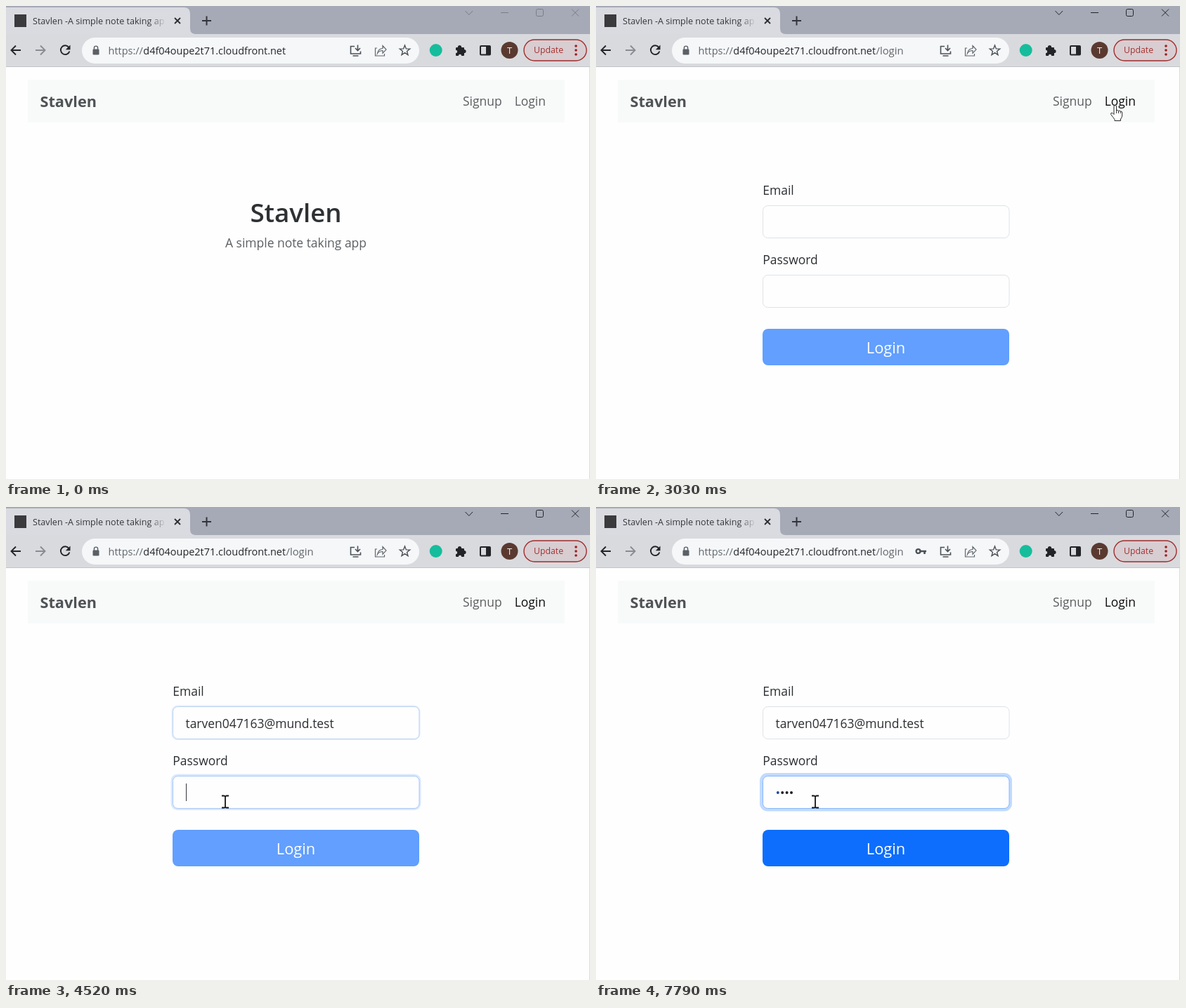
These frames come from a looping animation (831 px wide and 674 px high, 8000 ms). An HTML page with a canvas:

```html
<!DOCTYPE html>
<html lang="en">
<head>
<meta charset="utf-8">
<title>Note taking app login</title>
<style>
html, body { margin: 0; width: 100%; height: 100%; overflow: hidden; background: #fefefe; }
canvas { display: block; }
</style>
</head>
<body>
<canvas id="stage" width="831" height="674"></canvas>
<script>
const g = document.getElementById('stage').getContext('2d');
const LOOP = 8000;
const BRAND = 'Stavlen';
const EMAIL = 'tarven047163@mund.test';
const SUGGESTIONS = [EMAIL, 'Tarven.BommenaDrosuvek@mund.test', 'mo@mund.test',
  'owner@sample.test', 'zzzzz', 'benomrudavek1@mund.test'];
const BODY = 17.45;

const LOGIN_PAGE = 3030, EMAIL_FOCUS = 3370, POPUP_OPEN = 3510, ROW_HOVER = 3650,
  POPUP_CLOSE = 3980, PASS_FOCUS = 4450, KEY_ICON = 6090;
const KEYS = [6000, 6330, 7060, 7260];
const CARET_ON = [[4450, 4990], [5540, 6860], [7060, 7790]];
const CLICKS = [[2890, 3030], [3370, 3440], [3710, 3840], [4390, 4520]];

const linear = p => p;
const smooth = p => p * p * (3 - 2 * p);
const easeOut = p => 1 - (1 - p) ** 1.4;
// start, end, steps, easing, then a quadratic curve
const MOVES = [
  [260, 1000, 12, easeOut, 628, 690, 830, 330, 702, 177],
  [1070, 1350, 5, smooth, 702, 177, 420, 270, 104, 158],
  [1680, 2160, 8, smooth, 104, 158, 420, 104, 728, 150],
  [2620, 2620, 1, linear, 728, 150, 734, 145, 739, 140],
  [3100, 3370, 5, smooth, 739, 140, 620, 260, 435, 317],
  [3510, 3650, 3, linear, 435, 317, 406.5, 342.5, 378, 368],
  [3980, 4320, 6, smooth, 378, 368, 335, 390, 312, 420]
];

const ARROW = 'M.5 .5V17L4.3 13.3 6.9 19.5Q8.5 20 9.5 18.4L6.9 12.5H12.3Z';
const HAND = 'M-2 14V2.5Q-.2 .5 1.5 2.5V9Q3 7.5 4.5 9.5 6 8.3 7.3 10.2 9.5 9.5 9.7 12V16' +
  'Q9.5 19 7.5 21V23.5H-1V21.5Q-3 19 -6.3 14.5 -7 12 -4.2 12.3L-2 14.5Z';
const FINGERS = 'M1.5 9V13M4.5 9.5V13M7.3 10.2V13';
const IBEAM = 'M-5 -8.5H-1.5L0 -7.5 1.5 -8.5H5M0 -8V8M-5 8.5H-1.5L0 7.5 1.5 8.5H5';

const during = (t, spans) => spans.some(([a, b]) => t >= a && t < b);
const inside = (p, x0, y0, x1, y1) => p.x >= x0 && p.x < x1 && p.y >= y0 && p.y < y1;

function text(s, x, y, size, color, weight = 400, align = 'left') {
  g.font = `${weight} ${size}px "Open Sans", "Noto Sans", sans-serif`;
  g.textAlign = align;
  g.fillStyle = color;
  g.fillText(s, x, y);
}
function rect(x, y, w, h, color) {
  g.fillStyle = color;
  g.fillRect(x, y, w, h);
}
function box(x, y, w, h, r, fill, line, width = 1) {
  g.beginPath();
  g.roundRect(x, y, w, h, r);
  if (fill) { g.fillStyle = fill; g.fill(); }
  if (line) { g.strokeStyle = line; g.lineWidth = width; g.stroke(); }
}
function disc(x, y, r, color) {
  g.beginPath();
  g.arc(x, y, r, 0, 7);
  g.fillStyle = color;
  g.fill();
}
function stroke(d, color, width = 1.5) {
  g.strokeStyle = color;
  g.lineWidth = width;
  g.stroke(new Path2D(d));
}
function fill(d, color) {
  g.fillStyle = color;
  g.fill(new Path2D(d));
}

function drawTabs(t) {
  rect(0, 0, 831, 41, '#a6aab6');
  fill('M0 2H253Q262 2 262 11V32Q262 40 270 40V41H0Z', '#dadbe0');
  rect(12, 12, 17, 18, '#3b3b3d');
  const fade = g.createLinearGradient(204, 0, 228, 0);
  fade.addColorStop(0, '#33353a');
  fade.addColorStop(1, 'rgba(51,53,58,0)');
  text(BRAND + ' -A simple note taking ap', 38, 25.5, 12.6, fade);
  stroke('M240 17l8 8M248 17l-8 8', '#2b2c30', 1.8);
  stroke('M279 21h13M285.5 14.5v13', '#33343a', 2);

  const c = t < 2890 ? '#7a7d88' : '#222328';
  stroke('M653.5 7l5.3 5.5 5.3-5.5M704 9.5h11M805 4.5l10 10M815 4.5l-10 10', c, 1);
  box(754.5, 4.5, 10, 10, 2, null, c);
}

function star(x, y, color) {
  g.beginPath();
  for (let i = 0; i < 10; i++) {
    const r = i % 2 ? 3.2 : 7.6, a = i * Math.PI / 5 - Math.PI / 2;
    g.lineTo(x + r * Math.cos(a), y + r * Math.sin(a));
  }
  g.closePath();
  g.strokeStyle = color;
  g.lineWidth = 1.4;
  g.stroke();
}

function drawToolbar(t) {
  const black = '#232428', dark = '#4c5056', soft = '#62666c', bar = '#d9dade';
  rect(0, 40, 831, 46, bar);
  rect(0, 86, 831, 1, '#c3c4c8');
  box(108, 45, 480, 37, 18.5, '#f5f7f9');
  stroke('M21 63H8M14 56.5L7.5 63l6.5 6.5', black, 1.9);
  stroke('M42 63H55M49 56.5l6.5 6.5-6.5 6.5', '#8a8c92', 1.9);
  stroke('M89.5 59A6.4 6.4 0 1 0 90.4 64.5', black, 1.9);
  fill('M91.5 55.5v6.7h-6.7z', black);

  box(123.5, 61.5, 9, 8, 1.3, '#5b5f66');
  stroke('M125.4 62v-2.3a2.6 2.6 0 0 1 5.2 0V62', '#5b5f66', 1.4);
  text('https://', 145.5, 68.5, 14.5, soft);
  text('d4f04oupe2t71.cloudfront.net', 195.3, 68.5, 14.45, '#222428');
  if (t >= LOGIN_PAGE) text('/login', 398.5, 68.5, 14.8, soft);

  if (t >= KEY_ICON) {
    stroke('M455.6 63a2.9 2.9 0 1 0 5.8 0a2.9 2.9 0 1 0-5.8 0', dark, 2.4);
    stroke('M461.5 63H470M467.5 63v4', dark, 2.6);
  }
  stroke('M496 57.5H490.5V68H504.5V64.5M493.5 71H501.5', dark, 1.6);
  stroke('M500.5 55.5v7M497 60l3.5 3.5 3.5-3.5', dark, 1.6);
  stroke('M528 60H525.5V71H538.5V68M528.5 67.5Q530 60.5 536 60.5V56.5L541 62 536 67.3V63.5Q531 63.5 528.5 67.5Z', soft, 1.2);
  star(567.5, 63.5, dark);

  disc(611.7, 63, 9, '#15bd9c');
  box(640, 59, 12, 12, 1, black);
  disc(645.5, 58.5, 2.6, black);
  disc(652, 64.5, 2.6, black);
  disc(640, 65, 2.2, bar);
  disc(646, 71, 2.2, bar);
  box(675, 57, 14, 12.5, 1, null, black, 2);
  rect(683, 57, 6, 12.5, black);
  disc(716.5, 63, 12, '#5a3a30');
  text('T', 716.5, 68, 13, '#f4efed', 400, 'center');

  box(737, 48, 89, 30, 15, '#d8cdd1', '#a12d2c', 1.4);
  text('Update', 751, 67, 12.3, '#a6302f');
  for (const y of [57, 63, 69]) disc(811, y, 1.8, '#9c1c1c');
}

function drawNav(t, hover) {
  const plain = '#5b5d5e', hot = '#333';
  rect(31, 105, 764, 61, '#f8fafa');
  text(BRAND, 48.5, 144, 21.7, '#505355', 700);
  text('Signup', 650, 142, BODY, hover === 'signup' ? hot : plain);
  text('Login', 723.7, 142, BODY, t >= LOGIN_PAGE ? '#0b0b0b' : hover === 'login' ? hot : plain);
}

function drawHome() {
  text(BRAND, 412.5, 308, 36.7, '#2e3134', 600, 'center');
  text('A simple note taking app', 412.5, 344, BODY, '#5c6064', 400, 'center');
}

const ringAt = (t, start) => t < start ? 0 : [0, 0.6, 1][Math.min(2, Math.floor((t - start) / 70))];

function field(y, ring) {
  if (ring > 0) {
    const s = 4 * ring;
    box(237 - s, y - s, 351 + 2 * s, 46.5 + 2 * s, 7 + s, `rgba(13,110,253,${0.25 * ring})`);
  }
  const mix = (a, b) => Math.round(a + (b - a) * ring);
  box(237.5, y + 0.5, 350.5, 46, 7, '#fefefe', `rgb(${mix(222, 134)},${mix(226, 183)},${mix(230, 254)})`);
}

function drawLogin(t) {
  const ink = '#2b2e32';
  const passRing = ringAt(t, PASS_FOCUS);
  const emailRing = t < PASS_FOCUS ? ringAt(t, EMAIL_FOCUS) : 1 - passRing;
  text('Email', 237.3, 269, BODY, ink);
  field(284, emailRing);
  if (t >= ROW_HOVER) text(EMAIL, 255.5, 315, BODY, ink);
  text('Password', 237.3, 368, BODY, ink);
  field(383, passRing);

  const typed = KEYS.filter(k => t >= k).length;
  for (let i = 0; i < typed; i++) disc(258.8 + 6.4 * i, 407, 2, i ? '#1e2126' : '#234d9b');
  if (during(t, CARET_ON)) rect(Math.round(255.6 + 6.4 * typed), 394, 1, 25, typed === 1 ? '#4a73b4' : '#33363a');

  box(237, 460, 351, 52, 8, typed ? '#0d6efd' : '#629ffe');
  text('Login', 412.5, 495, 21.8, '#fff', 400, 'center');
  if (t >= POPUP_OPEN && t < POPUP_CLOSE) drawPopup(t);
}

function drawPopup(t) {
  g.save();
  g.shadowColor = 'rgba(0,0,0,.25)';
  g.shadowBlur = 3;
  g.shadowOffsetY = 1;
  box(345.5, 339.5, 278, 247, 4, '#fefefe');
  g.restore();
  box(345.5, 339.5, 278, 247, 4, '#fefefe', '#e8e9eb');
  fill('M360 340.5L369.5 331.5 379 340.5Z', '#fefefe');
  if (t >= ROW_HOVER) rect(346, 345, 277, 39, '#ebebed');
  SUGGESTIONS.forEach((s, i) => text(s, 359, 369 + 39.6 * i, 13.4, '#25282c'));
}

function pointerAt(t) {
  if (t < MOVES[0][0]) return null;
  const [t0, t1, n, ease, x0, y0, cx, cy, x1, y1] = MOVES.filter(m => t >= m[0]).pop();
  const gap = n > 1 ? (t1 - t0) / (n - 1) : 1;
  const step = Math.min(n, Math.floor((t - t0) / gap + 1e-6) + 1);
  const p = ease(step / n), q = 1 - p;
  return {
    x: Math.round(q * q * x0 + 2 * p * q * cx + p * p * x1),
    y: Math.round(q * q * y0 + 2 * p * q * cy + p * p * y1)
  };
}

function linkUnder(p) {
  if (!p || !inside(p, 641, 115, 777, 158)) return null;
  return p.x < 715 ? 'signup' : 'login';
}

function drawPointer(t, p, link) {
  if (during(t, CLICKS)) disc(p.x, p.y - 0.5, 12.3, 'rgba(252,243,40,.75)');
  const popup = t >= POPUP_OPEN && t < POPUP_CLOSE && inside(p, 345, 339, 624, 587);
  const input = t >= LOGIN_PAGE && !popup &&
    (inside(p, 237, 284, 589, 331) || inside(p, 237, 383, 589, 430));
  g.save();
  g.translate(p.x, p.y);
  g.lineJoin = 'round';
  if (input) {
    stroke(IBEAM, '#151515', 1.8);
  } else {
    const shape = link ? HAND : ARROW;
    fill(shape, '#fff');
    stroke(shape, '#2a2a2a', 1);
    if (link) stroke(FINGERS, '#2a2a2a', 0.9);
  }
  g.restore();
}

function draw(t) {
  const pointer = pointerAt(t), link = linkUnder(pointer);
  rect(0, 0, 831, 674, '#fefefe');
  drawTabs(t);
  drawToolbar(t);
  drawNav(t, link);
  if (t < LOGIN_PAGE) drawHome();
  else drawLogin(t);
  rect(830, 87, 1, 587, '#d9dadd');
  if (pointer) drawPointer(t, pointer, link);
}

const start = performance.now();
function tick() {
  draw((performance.now() - start) % LOOP);
  requestAnimationFrame(tick);
}
tick();
</script>
</body>
</html>
```
